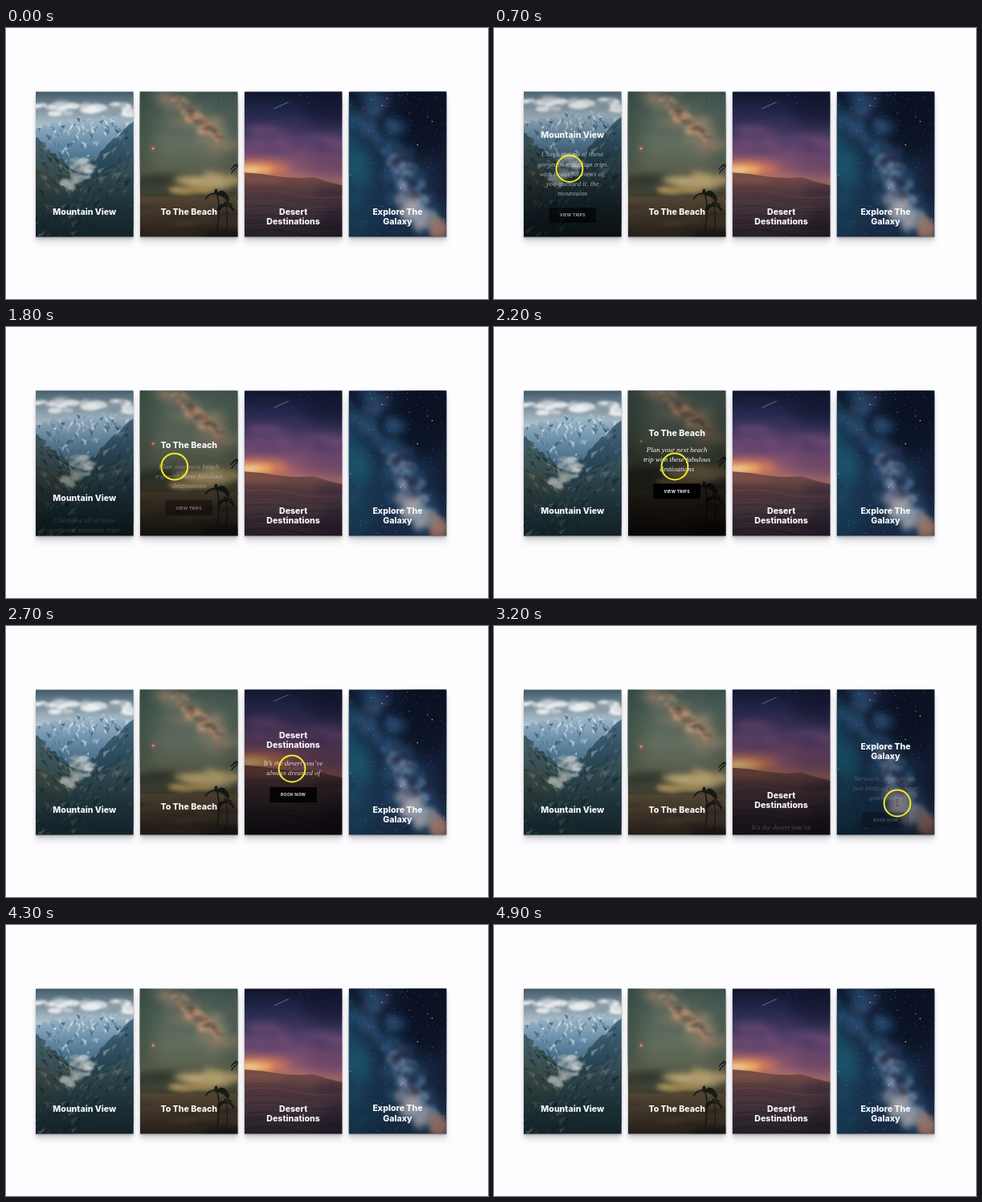
These frames come from a looping animation (600 px wide and 338 px high, 5 s). An HTML page:

```html
<!DOCTYPE html>
<html lang="en">
<head>
<meta charset="utf-8">
<title>Travel cards</title>
<style>
html, body { margin: 0; width: 100%; height: 100%; overflow: hidden; background: #fdfcff; }
#stage { display: block; width: 100vw; height: 100vh; }
text { text-anchor: middle; fill: #f7f7f7; }
.title { font: 800 10.6px Inter, sans-serif; }
.copy { font: italic 8.9px "Liberation Serif", serif; }
.btn { font: 700 5.2px Inter, sans-serif; letter-spacing: .2px; fill: #fff; }
</style>
</head>
<body>
<svg id="stage" viewBox="0 0 600 338"></svg>
<script>
const LOOP = 5000, STEP = 100;
const X0 = 37, Y0 = 79.3, W = 121.6, H = 181, PITCH = 129.9;
const LINE = 12.6, COPY = 12.1;

let seed = 11;
const rnd = (a = 0, b = 1) => {
  seed = (seed * 16807) % 2147483647;
  return a + (b - a) * seed / 2147483647;
};
const spread = s => (rnd() + rnd() + rnd() - 1.5) * s;
const pick = list => list[Math.floor(rnd(0, list.length))];
const many = (n, fn) => Array.from({ length: n }, (_, i) => fn(i)).join('');
const mix = (a, b, k) => a + (b - a) * k;

// Picture parts
let ids = 0;
const stops = list => list.map((c, i) => `<stop offset="${i / (list.length - 1)}" stop-color="${c}"/>`).join('');
const paint = (d, ...colors) => {
  const id = 'g' + ids++;
  return `<linearGradient id="${id}" x2="0" y2="1">${stops(colors)}</linearGradient><path d="${d}" fill="url(#${id})"/>`;
};
const box = (y, h) => `M0 ${y}h122v${h}h-122z`;
const soft = (blur, body) => `<g style="filter:blur(${blur}px)">${body}</g>`;
const blob = (x, y, rx, ry, fill, o = 1) =>
  `<ellipse cx="${x}" cy="${y}" rx="${rx}" ry="${ry}" fill="${fill}" opacity="${o}"/>`;

// Soft puffs scattered along a line
const haze = (n, from, to, width, size, colors, o, blur, flat = .6) => soft(blur, many(n, () => {
  const k = rnd(), r = size * rnd(.4, 1.2);
  return blob(mix(from[0], to[0], k) + spread(width), mix(from[1], to[1], k) + spread(width), r, r * flat, pick(colors), o);
}));

const stars = (n, height, size, colors) => many(n, () =>
  blob(rnd(0, 122), rnd(0, height), size, size, pick(colors), rnd(.2, .9)));

// A jagged crest filled down to the floor and scored with rock faces
function slope(crest, rough, floor, colors, n, lean, tones) {
  const id = 'c' + ids++, steps = 9;
  let d = '';
  crest.slice(1).forEach(([x, y], i) => {
    for (let s = 0; s < steps; s++) {
      d += `L${mix(crest[i][0], x, s / steps)} ${mix(crest[i][1], y, s / steps) + rnd(-rough, rough)}`;
    }
  });
  const [first, last] = [crest[0], crest[crest.length - 1]];
  const shape = `M${first[0]} ${floor}${d}L${last}V${floor}Z`;
  const faces = many(n, () => {
    const k = rnd(.3, 1.2), x = rnd(first[0], last[0]);
    const at = crest.findIndex(p => p[0] >= x) || 1, [a, b] = [crest[at - 1], crest[at]];
    const y = mix(a[1], b[1], (x - a[0]) / (b[0] - a[0])) + rnd() ** 1.4 * 65 - 4;
    const dx = (lean || pick([-5, 5])) * k;
    return `<path d="M${x} ${y}l${dx} ${9 * k}l${rnd(-3, 3)} ${-6 * k}z" fill="${pick(tones)}" opacity="${rnd(.25, .75)}"/>`;
  });
  return `<clipPath id="${id}"><path d="${shape}"/></clipPath>` +
    paint(shape, ...colors) + `<g clip-path="url(#${id})">${faces}</g>`;
}

const mountain = () =>
  paint(box(0, 60), '#425b69', '#94a8b4', '#d9e4ea') +
  haze(34, [0, 19], [122, 21], 9, 11, ['#fff', '#eceff0', '#cdd4d8', '#8b9aa4'], .75, 1.8, .4) +
  slope([[0, 46], [30, 37], [60, 34], [90, 33], [122, 40]], 5, 112, ['#a7bfd0', '#5f86a2', '#2c4f66'],
    150, 0, ['#f5f9fb', '#d3e2ec', '#3b627e', '#28485f']) +
  slope([[50, 104], [85, 72], [122, 37]], 2.5, 170, ['#46677d', '#24424f', '#1b343f'],
    110, -7, ['#7e99a9', '#152f3d', '#2e5064']) +
  slope([[0, 57], [25, 80], [56, 102]], 2.5, 170, ['#46626d', '#35494a', '#28393b'],
    110, 7, ['#7f918f', '#1c3137', '#56675f']) +
  haze(40, [44, 88], [70, 98], 9, 6, ['#b5c2c7', '#d7dcdc', '#6f868f'], .7, .8, .4) +
  haze(40, [60, 100], [24, 135], 9, 6, ['#a2abaa', '#7e8c8c', '#c1c6c4'], .6, 1, .5) +
  slope([[0, 94], [25, 108], [46, 132]], 2, 200, ['#3f4e48', '#25363a', '#1a2a2e'],
    70, 6, ['#63716b', '#17292e', '#4a5950']) +
  slope([[0, 158], [40, 130], [75, 105], [122, 80]], 2, 200, ['#3f5963', '#223840', '#14252b'],
    180, -7, ['#5f747a', '#10242b', '#3a5152', '#22393f']);

const palm = (x, y, size) =>
  `<g transform="translate(${x} ${y}) scale(${size})" fill="none" stroke="#191b16" stroke-linecap="round">` +
  '<path d="M0 0Q5 20 0 50" stroke-width="1.8"/>' +
  many(13, () => {
    const a = rnd(2.6, 6.8), dx = Math.cos(a) * 16, dy = Math.sin(a) * 9;
    return `<path d="M0 0Q${dx * .6} ${dy - 3} ${dx} ${dy + 7}" stroke-width="1.9"/>`;
  }) + '</g>';

const beach = () =>
  paint(box(0, 135), '#3a4f4a', '#536359', '#636f60', '#5d624f', '#3f3d2f') +
  soft(10, blob(0, 45, 16, 60, '#33463d', .6) + blob(120, 70, 10, 50, '#3e4c41', .6)) +
  haze(60, [28, -4], [112, 72], 22, 10, ['#96806a', '#a58a70', '#7d7a66'], .3, 4) +
  haze(45, [32, 2], [105, 68], 9, 5, ['#c98d6d', '#d8a283', '#a87260'], .45, 2) +
  haze(24, [40, 6], [108, 66], 6, 4, ['#51483f', '#5d5248'], .45, 1.6) +
  stars(110, 95, .35, ['#c9c9b1', '#a4b2a0', '#d2a179']) +
  haze(20, [0, 112], [36, 110], 6, 18, ['#2d332a', '#3b4034'], .5, 4, .3) +
  haze(26, [52, 112], [116, 112], 9, 14, ['#c3ae7c', '#b39d6b', '#9a8a62'], .55, 3, .5) +
  haze(14, [40, 124], [88, 124], 4, 14, ['#c0a366', '#a88d58'], .5, 2.5, .3) +
  paint(box(131, 70), '#5a4c38', '#463a2d', '#322a22', '#28211b') +
  haze(20, [0, 150], [122, 165], 14, 22, ['#5a4a38', '#241e19'], .3, 2, .12) +
  soft(1.2, blob(16.3, 71, 2.5, 2.5, '#dc6539', .7)) + blob(16.3, 71, .9, .9, '#ffd7a5') +
  palm(96, 128, .9) + palm(107, 142, .65) + palm(124, 94, .7) +
  soft(4, blob(105, 184, 30, 12, '#1b1815', .8));

const desert = () =>
  paint(box(0, 122), '#10152c', '#22264a', '#3f365f', '#6a4870', '#9c6073', '#d08a68') +
  soft(10, blob(112, 18, 40, 26, '#10142b', .6) + blob(115, 90, 44, 18, '#65436a', .75)) +
  haze(24, [0, 56], [122, 70], 12, 22, ['#74507e', '#8f5c80', '#433560'], .35, 4, .2) +
  soft(6, blob(14, 96, 42, 10, '#ee8a55', .75)) +
  soft(4, blob(10, 98, 26, 6, '#ffc773', .9) + blob(6, 99, 12, 3, '#fff0b8')) +
  stars(45, 60, .35, ['#c8c8e6', '#8693bb']) +
  '<path d="M36.5 21.5L55 13" stroke="#7bc0bd" stroke-width=".7" opacity=".8"/>' +
  paint('M0 101Q22 102 43 106Q62 109 86 107Q104 113 122 117V200H0Z', '#7d5049', '#5b3f44', '#443440', '#2f2532', '#221c27') +
  soft(4, blob(18, 110, 34, 4, '#9c6450', .5) + blob(112, 124, 26, 7, '#3a2b3c', .6)) +
  many(26, i => `<path d="M0 ${120 + i * 3}q30 -5 60 2t62 3" fill="none" stroke="${pick(['#1f1925', '#765858'])}" stroke-width=".6" opacity=".3"/>`) +
  soft(8, blob(118, 168, 26, 26, '#211a29', .5));

const galaxy = () =>
  paint(box(0, 200), '#0f1930', '#152840', '#1a3350', '#1d3858', '#1d3050') +
  haze(26, [4, 20], [8, 165], 18, 16, ['#1d5570', '#18465f', '#24647c'], .35, 6, 1) +
  soft(10, blob(100, 30, 42, 56, '#0a1022', .85) + blob(122, 100, 20, 46, '#131a31', .8)) +
  haze(80, [20, 12], [92, 160], 24, 9, ['#2f5d85', '#3c6f96', '#274a74', '#4d5a86'], .3, 3.5, 1) +
  haze(50, [55, 80], [98, 165], 14, 6, ['#6f94b6', '#85a5c2', '#8c88a6'], .4, 2.2, 1) +
  haze(34, [58, 72], [94, 140], 18, 5, ['#141f36', '#1e2b44'], .45, 2, 1) +
  haze(26, [76, 146], [104, 172], 11, 7, ['#b4c9da', '#9fb9d0', '#cbb6b4'], .5, 3, 1) +
  haze(22, [108, 160], [120, 188], 9, 8, ['#c18d78', '#a97a73'], .45, 3, 1) +
  stars(300, 198, .4, ['#fff', '#b8d7ec', '#7db3d3', '#d8c8d5']) +
  stars(16, 180, .75, ['#d8f0ff']);

const cards = [
  { title: ['Mountain View'], btn: 'VIEW TRIPS', photo: mountain,
    copy: ['Check out all of these', 'gorgeous mountain trips', 'with beautiful views of,', 'you guessed it, the', 'mountains'] },
  { title: ['To The Beach'], btn: 'VIEW TRIPS', photo: beach,
    copy: ['Plan your next beach', 'trip with these fabulous', 'destinations'] },
  { title: ['Desert', 'Destinations'], btn: 'BOOK NOW', photo: desert,
    copy: ['It\u2019s the desert you\u2019ve', 'always dreamed of'] },
  { title: ['Explore The', 'Galaxy'], btn: 'BOOK NOW', photo: galaxy,
    copy: ['Seriously, straight up,', 'just blast off into outer', 'space today'] }
];

// The pointer rests at each stop and moves straight to the next
const rests = [
  { from: 0, until: 300, x: 80, y: 360 },
  { from: 700, until: 1420, x: 94, y: 175.5 },
  { from: 1850, until: 2250, x: 225, y: 174 },
  { from: 2600, until: 2970, x: 356, y: 178 },
  { from: 3200, until: 3800, x: 502, y: 221 },
  { from: 4100, until: LOOP, x: 480, y: 390 }
];

function pointerAt(t) {
  const i = rests.findIndex(r => t <= r.until), b = rests[i], a = rests[i - 1] || b;
  const k = t >= b.from ? 1 : (t - a.until) / (b.from - a.until);
  return [mix(a.x, b.x, k), mix(a.y, b.y, k)];
}

// When the pointer enters and leaves each card
cards.forEach((card, i) => {
  card.x = X0 + i * PITCH;
  for (let t = 0; t < LOOP; t += 2) {
    const [x, y] = pointerAt(t);
    if (x < card.x || x > card.x + W || y < Y0 || y > Y0 + H) continue;
    card.on ??= t;
    card.off = t + 2;
  }
});

const shadeId = 'shade';
const shade = `<linearGradient id="${shadeId}" x2="0" y2="1">${many(21, i => {
  const u = (i / 20) ** 1.55;
  return `<stop offset="${i / 20}" stop-opacity="${.79 * u * u * (3 - 2 * u)}"/>`;
})}</linearGradient>`;

const lines = (list, cls, y, gap) => list.map((s, i) =>
  `<text class="${cls}" x="${W / 2}" y="${y + i * gap}">${s}</text>`).join('');

function cardMarkup({ x, title, copy, btn, photo }) {
  const copyY = (title.length - 1) * LINE + 21.5;
  const btnY = copyY + (copy.length - 1) * COPY + 27.4;
  const shadow = many(5, i => {
    const d = 2 ** i / 2;
    return `<rect x="${x}" y="${Y0 + d}" width="${W}" height="${H}" opacity=".1" style="filter:blur(${d / 2}px)"/>`;
  });
  return shadow + `<svg x="${x}" y="${Y0}" width="${W}" height="${H}" overflow="hidden">
    <g class="photo">${photo()}</g>
    <rect class="shade" width="${W}" height="${2 * H}" fill="url(#${shadeId})"/>
    <g class="content">${lines(title, 'title', 3.8, LINE)}
      <g class="extra">${lines(copy, 'copy', copyY + 2.8, COPY)}
        <rect x="${W / 2 - 29.3}" y="${btnY - 9.6}" width="58.6" height="19"/>
        <text class="btn" x="${W / 2}" y="${btnY + 1.8}">${btn}</text>
      </g></g></svg>`;
}

const stage = document.getElementById('stage');
stage.innerHTML = shade + cards.map(cardMarkup).join('') +
  `<g id="pointer"><circle r="16.4" fill="none" stroke="#f3eb25" stroke-width="2"/>
    <path id="beam" d="M-1.5 -4.5H1.5M0 -4.5V3.5M-1.5 3.5H1.5" stroke="#20242a" stroke-width=".8" fill="none"/>
    <path id="arrow" d="M0 -1V7.5L2 5.8L3.4 8.8L4.8 8.1L3.5 5.3H6Z" fill="#fff" stroke="#222" stroke-width=".5"/></g>`;

const all = cls => [...stage.querySelectorAll('.' + cls)];
const photos = all('photo'), shades = all('shade'), contents = all('content'), extras = all('extra');
const [pointer, beam, arrow] = ['pointer', 'beam', 'arrow'].map(id => document.getElementById(id));

// cubic-bezier(.19, 1, .22, 1)
function ease(p) {
  if (p <= 0) return 0;
  if (p >= 1) return 1;
  let lo = 0, hi = 1;
  for (let i = 0; i < 24; i++) {
    const u = (lo + hi) / 2, v = 1 - u;
    if (.57 * u * v * v + .66 * u * u * v + u * u * u < p) lo = u; else hi = u;
  }
  return 1 - (1 - lo) ** 3;
}

const move = (el, y) => el.setAttribute('transform', `translate(0 ${y.toFixed(3)})`);

function draw(t) {
  cards.forEach((card, i) => {
    const over = t >= card.on && t < card.off;
    const dt = over ? t - card.on : t < card.on ? Infinity : t - card.off;
    const level = (ms, delay = 0) => {
      const e = ease((dt - (over ? delay : 0)) / ms);
      return over ? e : 1 - e;
    };
    // The block is centred while hovered and bottom aligned otherwise
    const span = card.title.length * LINE + card.copy.length * COPY + 40;
    const travel = span - 20.5;
    const top = over ? (H - span + LINE) / 2 : 149.7 - travel;
    const shown = level(700, 87.5);
    move(photos[i], -8 * level(1050));
    move(shades[i], -H * level(1400));
    move(contents[i], top + travel * (1 - level(700)));
    move(extras[i], 8.2 * (1 - shown));
    extras[i].setAttribute('opacity', shown);
  });
  const [x, y] = pointerAt(t);
  const onText = t >= 600 && t < 3300;
  pointer.setAttribute('transform', `translate(${x} ${y})`);
  beam.setAttribute('opacity', onText ? .6 : 0);
  arrow.setAttribute('opacity', onText ? 0 : 1);
}

const start = performance.now();
function tick() {
  const t = (performance.now() - start) % LOOP;
  draw(Math.floor(t / STEP) * STEP);
  requestAnimationFrame(tick);
}
tick();
</script>
</body>
</html>
```
